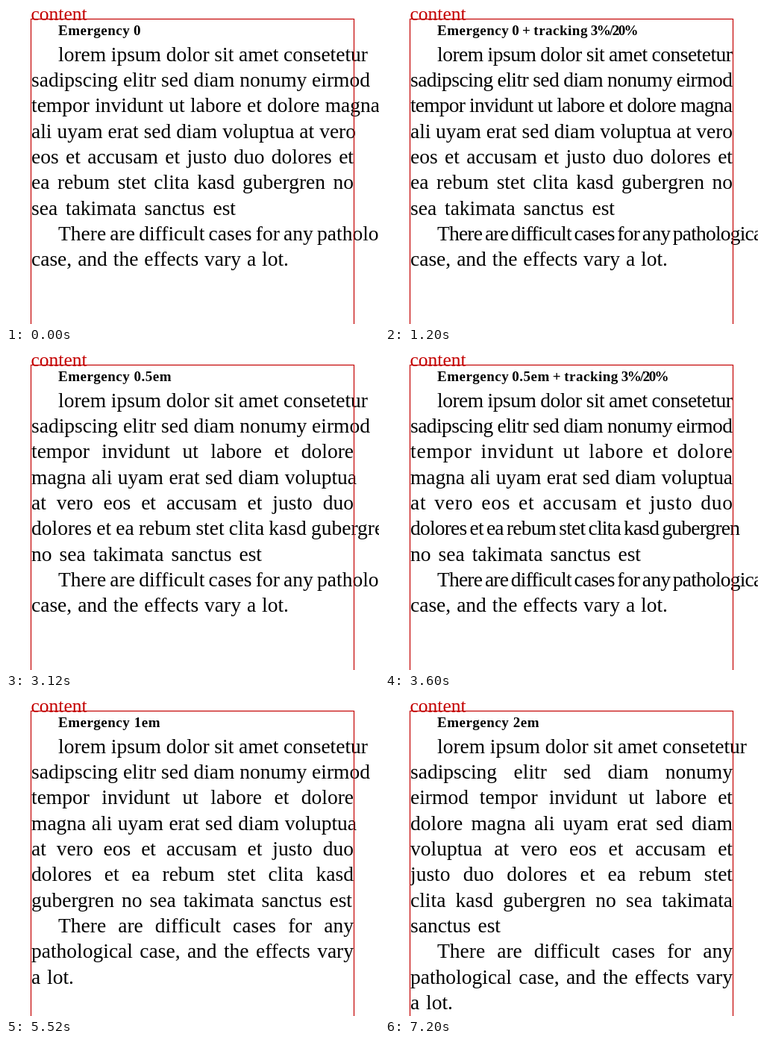
Recreate the animation shown at these times as an HTML page. Size 500 by 426 pixels, loop 8000 ms.

```html
<!DOCTYPE html>
<html lang="en">
<head>
<meta charset="utf-8">
<title>Emergency stretch and tracking</title>
<style>
  html, body { margin: 0; width: 100%; height: 100%; overflow: hidden; background: #fff; }
  svg { display: block; width: 500px; height: 426px; font-family: "Liberation Serif", serif; }
  .body { font-size: 27.5px; }
  .head { font-size: 19px; font-weight: bold; letter-spacing: .5px; }
  .ratio { letter-spacing: -1.6px; }
  .label { font-size: 25.5px; fill: #c40000; }
  .box { fill: none; stroke: #c40000; stroke-width: 1.2; }
</style>
</head>
<body>
<svg id="stage" viewBox="0 0 500 426">
  <text class="label" x="33.5" y="18.5">content</text>
  <g id="pages"></g>
  <rect class="box" x="33.5" y="17.5" width="433" height="440"/>
</svg>
<script>
const LOOP = 8000, HOLD = 1200;
const LEFT = 34, INDENT = 70, RIGHT = 466;
const FIRST = 73.8, LEADING = 34.3;
const WIDE = .8, TIGHT = -.8;

const line = (text, end = RIGHT, track = 0, x = LEFT) => ({ text, end, track, x });
const indented = (text, end, track) => line(text, end, track, INDENT);

// Lines shared between pages, with their loose and tracked settings.
const lorem = (end, track) => indented("lorem ipsum dolor sit amet consetetur", end, track);
const sadip = (end, track) => line("sadipscing elitr sed diam nonumy eirmod", end, track);
const tempor = track => line("tempor invidunt ut labore et dolore", RIGHT, track);
const magna = (end, track) => line("magna ali uyam erat sed diam voluptua", end, track);
const atVero = track => line("at vero eos et accusam et justo duo", RIGHT, track);
const gubergren = (end, track) => line("dolores et ea rebum stet clita kasd gubergren", end, track);
const kasd = track => line("dolores et ea rebum stet clita kasd", RIGHT, track);
const there = track => indented("There are difficult cases for any", RIGHT, track);

const loose = [lorem(485), sadip(488)];
const tracked = [lorem(RIGHT, -.5), sadip(RIGHT, -.55)];
const eos = [
  line("eos et accusam et justo duo dolores et"),
  line("ea rebum stet clita kasd gubergren no"),
  line("sea takimata sanctus est", 308)
];
const noSea = line("no sea takimata sanctus est", 343);
const lastLoren = line("gubergren no sea takimata sanctus est", 464);
const cases = (end, track) => [
  indented("There are difficult cases for any pathological", end, track),
  line("case, and the effects vary a lot.", 379)
];
const tail = [line("pathological case, and the effects vary"), line("a lot.", 91)];
const over = cases(553), overTracked = cases(513, TIGHT);

const pages = [
  { stretch: "0", end: 181, lines: [...loose,
    line("tempor invidunt ut labore et dolore magna", 501),
    line("ali uyam erat sed diam voluptua at vero", 469), ...eos, ...over] },
  { stretch: "0", end: 338, ratio: true, lines: [...tracked,
    line("tempor invidunt ut labore et dolore magna", RIGHT, TIGHT),
    line("ali uyam erat sed diam voluptua at vero", RIGHT, -.08), ...eos, ...overTracked] },
  { stretch: "0.5em", end: 222, lines: [...loose,
    tempor(), magna(470), atVero(), gubergren(520), noSea, ...over] },
  { stretch: "0.5em", end: 379, ratio: true, lines: [...tracked,
    tempor(WIDE), magna(RIGHT, -.1), atVero(WIDE), gubergren(476, TIGHT), noSea, ...overTracked] },
  { stretch: "1em", end: 207, lines: [...loose,
    tempor(), magna(470), atVero(), kasd(), lastLoren, there(), ...tail] },
  { stretch: "1em", end: 365, ratio: true, lines: [...tracked,
    tempor(WIDE), magna(RIGHT, -.1), atVero(WIDE), kasd(WIDE), lastLoren, there(WIDE), ...tail] },
  { stretch: "2em", end: 207, lines: [lorem(485),
    line("sadipscing elitr sed diam nonumy"),
    line("eirmod tempor invidunt ut labore et"),
    line("dolore magna ali uyam erat sed diam"),
    line("voluptua at vero eos et accusam et"),
    line("justo duo dolores et ea rebum stet"),
    line("clita kasd gubergren no sea takimata"),
    line("sanctus est", 155), there(), ...tail] }
];

function add(parent, tag, attrs = {}, text = "") {
  const el = document.createElementNS("http://www.w3.org/2000/svg", tag);
  for (const key in attrs) el.setAttribute(key, attrs[key]);
  el.textContent = text;
  return parent.appendChild(el);
}

// Share the remaining room among the word spaces.
function justify(el, x, end, track = 0) {
  const gaps = el.textContent.split(" ").length - 1;
  const room = end - x - el.getComputedTextLength() + track;
  el.style.wordSpacing = room / gaps + "px";
}

function drawPage(page) {
  const g = add(document.getElementById("pages"), "g");
  const title = "Emergency " + page.stretch + (page.ratio ? " + tracking " : "");
  const head = add(g, "text", { class: "head", x: INDENT, y: 39.3 }, title);
  if (page.ratio) add(head, "tspan", { class: "ratio" }, "3%/20%");
  justify(head, INDENT, page.end);

  page.lines.forEach(({ text, end, track, x }, row) => {
    const el = add(g, "text", { class: "body", x, y: FIRST + row * LEADING }, text);
    el.style.letterSpacing = track + "px";
    justify(el, x, end, track);
  });
  return g;
}

pages.forEach((page, i) => {
  const from = i * HOLD / LOOP;
  const to = Math.min(1, (i + 1) * HOLD / LOOP);
  const key = (offset, opacity) => ({ offset, opacity, easing: "step-end" });
  const keys = [key(from, 1), key(to, to < 1 ? 0 : 1)];
  if (from > 0) keys.unshift(key(0, 0));
  if (to < 1) keys.push(key(1, 0));
  drawPage(page).animate(keys, { duration: LOOP, iterations: Infinity });
});
</script>
</body>
</html>
```
